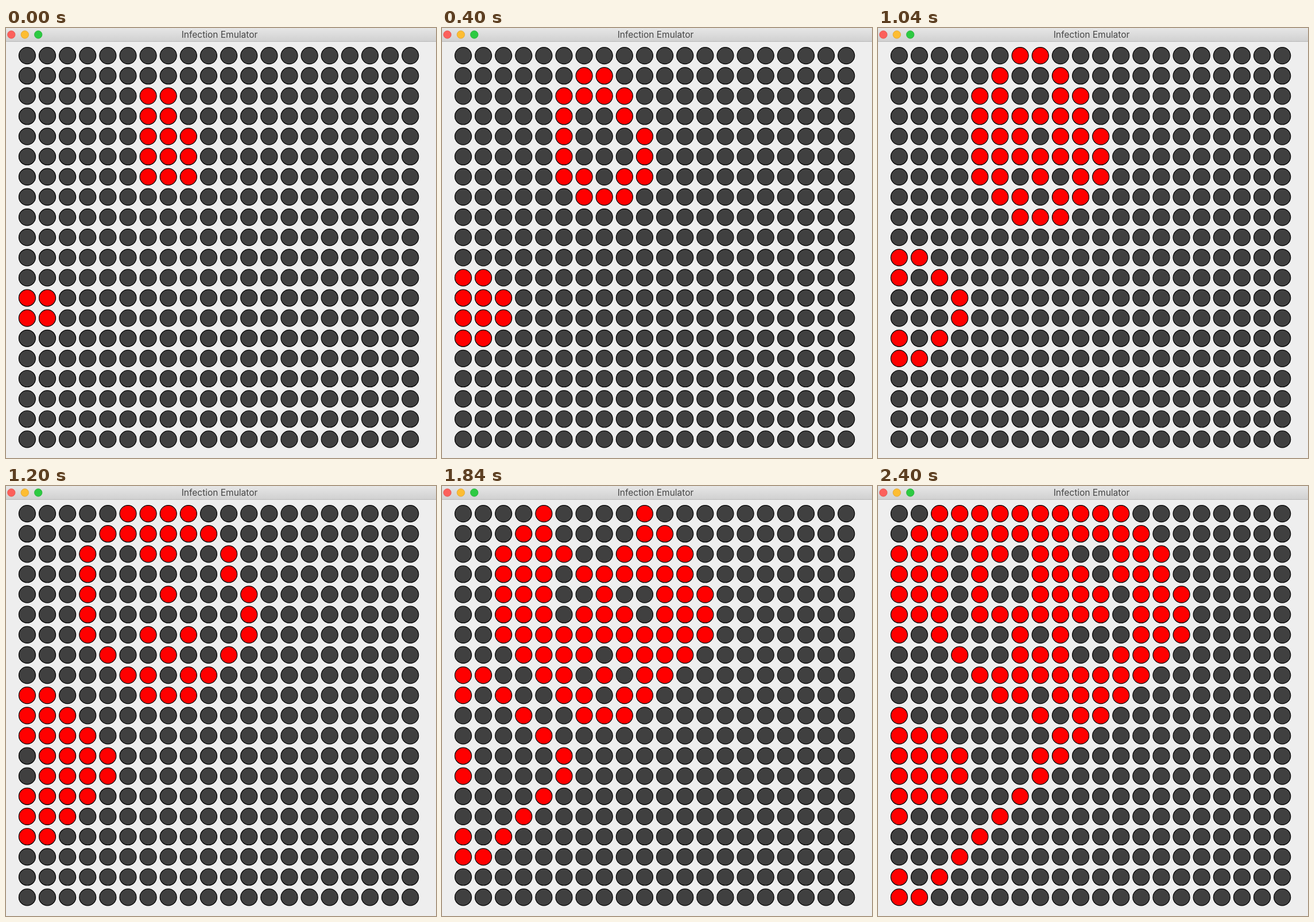
Write an HTML page with a canvas that moves like this. It is 749 px wide and 748 px high and loops after 2800 ms.

```html
<!DOCTYPE html>
<html lang="en">
<head>
<meta charset="utf-8">
<title>Infection Emulator</title>
<style>
  html, body { margin: 0; width: 100%; height: 100%; overflow: hidden; background: #eee; }
  canvas { display: block; }
</style>
</head>
<body>
<canvas id="stage" width="749" height="748"></canvas>
<script>
const ctx = document.getElementById('stage').getContext('2d');
const SIZE = 20, STEP_MS = 400, GENERATIONS = 7;
const PITCH = 35.12, LEFT = 36.9, TOP = 48.1, RADIUS = 14.5;

const emptyGrid = () => Array.from({ length: SIZE }, () => Array(SIZE).fill(false));

function infect(grid, row, col, rows, cols) {
  for (let r = row; r < row + rows; r++) grid[r].fill(true, col, col + cols);
}

function countNeighbours(grid, row, col) {
  let count = 0;
  for (let r = row - 1; r <= row + 1; r++)
    for (let c = col - 1; c <= col + 1; c++)
      if ((r !== row || c !== col) && grid[r]?.[c]) count++;
  return count;
}

// The sick recover when crowded; the healthy catch it from two or more.
function nextGeneration(grid) {
  return grid.map((line, r) => line.map((sick, c) => {
    const n = countNeighbours(grid, r, c);
    return sick ? n <= 3 : n >= 2;
  }));
}

function buildGenerations() {
  const seed = emptyGrid();
  infect(seed, 2, 6, 5, 2);
  infect(seed, 4, 8, 3, 1);
  infect(seed, 12, 0, 2, 2);
  const list = [seed];
  while (list.length < GENERATIONS) list.push(nextGeneration(list[list.length - 1]));
  return list;
}

function disc(x, y, radius, fill, stroke, width) {
  ctx.beginPath();
  ctx.arc(x, y, radius, 0, Math.PI * 2);
  ctx.fillStyle = fill;
  ctx.fill();
  ctx.strokeStyle = stroke;
  ctx.lineWidth = width;
  ctx.stroke();
}

function drawTitleBar() {
  const shade = ctx.createLinearGradient(0, 0, 0, 23);
  shade.addColorStop(0, '#e6e6e6');
  shade.addColorStop(1, '#d1d1d1');
  ctx.fillStyle = shade;
  ctx.fillRect(0, 0, 749, 23);
  ctx.fillStyle = '#b8b8b8';
  ctx.fillRect(0, 23, 749, 1);

  disc(9.3, 11.5, 6.7, '#fc605b', '#e2504a', 0.8);
  disc(32.8, 11.5, 6.7, '#fdbd33', '#dfa12c', 0.8);
  disc(56.2, 11.5, 6.7, '#2dca42', '#24ac34', 0.8);

  ctx.fillStyle = '#464646';
  ctx.font = '15.5px Inter, Roboto, sans-serif';
  ctx.textAlign = 'center';
  ctx.textBaseline = 'alphabetic';
  ctx.fillText('Infection Emulator', 372, 17);
}

function drawGrid(grid) {
  grid.forEach((line, r) => line.forEach((sick, c) => {
    disc(LEFT + c * PITCH, TOP + r * PITCH, RADIUS, sick ? '#ff0000' : '#404040', '#000', 1.2);
  }));
}

const generations = buildGenerations();
const start = performance.now();

function render() {
  const elapsed = performance.now() - start;
  ctx.fillStyle = '#eeeeee';
  ctx.fillRect(0, 0, 749, 748);
  drawTitleBar();
  drawGrid(generations[Math.floor(elapsed / STEP_MS) % GENERATIONS]);
  requestAnimationFrame(render);
}
render();
</script>
</body>
</html>
```
